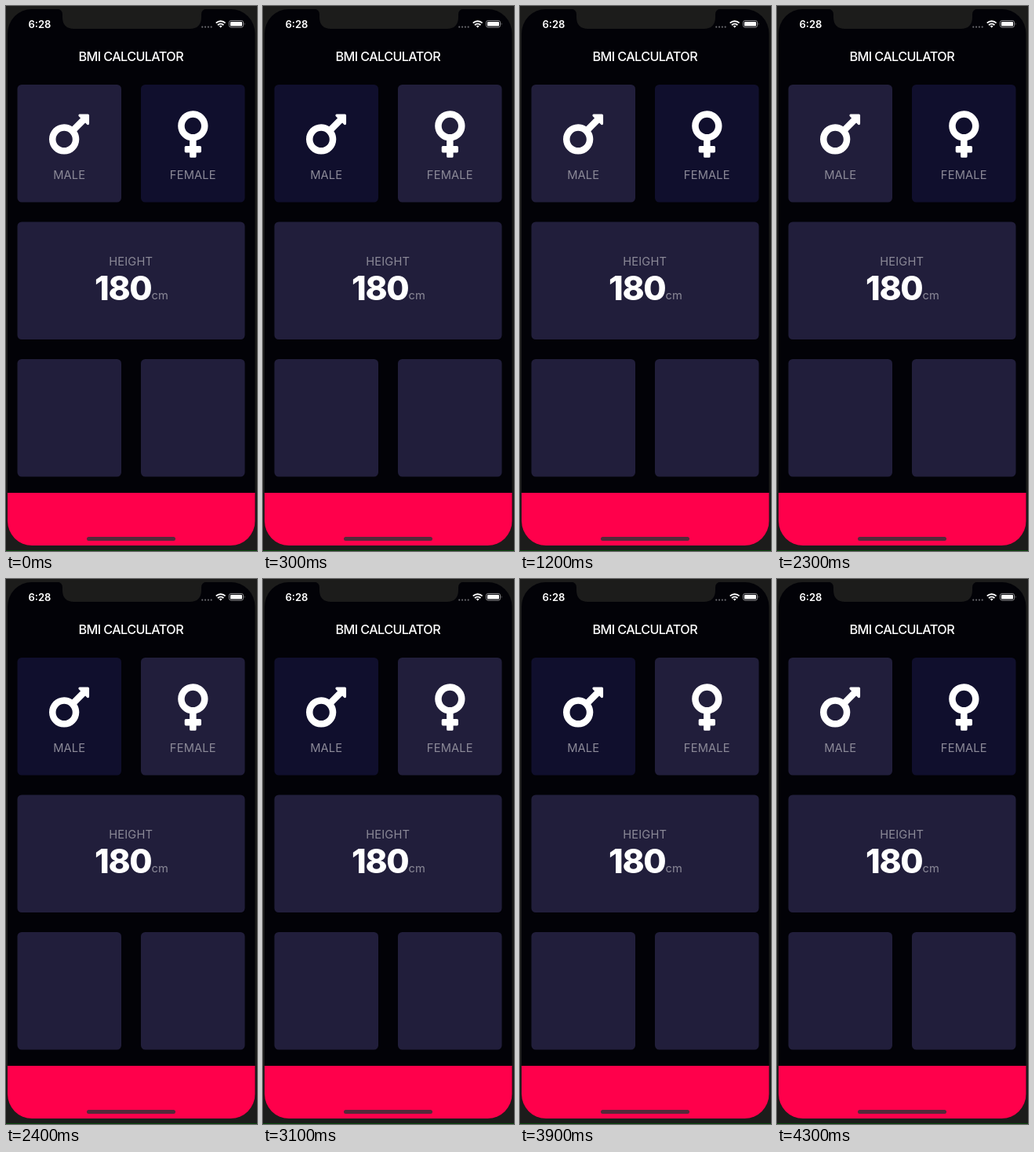
Animation of 320 by 693 pixels, one loop 4400 ms. Source, as an HTML page:

```html
<!DOCTYPE html>
<html lang="en">
<head>
<meta charset="utf-8">
<title>BMI Calculator</title>
<style>
  html, body { margin: 0; width: 100%; height: 100%; overflow: hidden; background: #1c1c1b; }
  svg { display: block; width: 100%; height: 100%; font-family: Inter, "Liberation Sans", sans-serif; }
  .card { fill: #211e3b; }
  .idle { fill: #100f2d; }
  .label { fill: #8b8997; font-size: 14.7px; letter-spacing: .15px; text-anchor: middle; }
  .white { fill: #fff; }
</style>
</head>
<body>
<svg viewBox="0 0 320 693">
  <defs>
    <clipPath id="screen"><rect x="2" y="4" width="315.5" height="682" rx="31"/></clipPath>
  </defs>
  <rect y="692" width="320" height="1" fill="#0b470d"/>

  <g clip-path="url(#screen)">
    <rect width="320" height="693" fill="#020207"/>
    <rect y="619" width="320" height="74" fill="#ff004b"/>
  </g>
  <path fill="#1c1c1b" d="M65 3.5Q72 4 72 11V14Q72 29 87 29H234Q249 29 249 14V11Q249 4 256 3.5Z"/>
  <rect x="103" y="675" width="113" height="5" rx="2.5" fill="#54293a"/>

  <!-- status bar -->
  <text class="white" x="28.5" y="27.5" font-size="13" font-weight="600">6:28</text>
  <path d="M250.3 26.7h12.5" stroke="#66666b" stroke-width="2.2" stroke-linecap="round" stroke-dasharray="0 3.8"/>
  <g fill="none" stroke="#fff" stroke-width="1.9">
    <path d="M267.8 21.6a8.4 8.4 0 0 1 11.8 0M270 24.2a5.3 5.3 0 0 1 7.4 0"/>
    <path d="M271.8 25.6a3 3 0 0 1 3.8 0L273.7 27.8Z" fill="#fff" stroke="none"/>
    <rect x="284.5" y="18.5" width="18" height="8.6" rx="2.4" stroke="#8b8b8e" stroke-width="1"/>
  </g>
  <rect class="white" x="286" y="20" width="15" height="5.6" rx="1.2"/>
  <path d="M303.8 21.2q1.6 1.6 0 3.2z" fill="#8b8b8e"/>

  <text class="white" x="159.3" y="70" font-size="16.2" font-weight="500" letter-spacing="-.6" text-anchor="middle">BMI CALCULATOR</text>

  <g id="cards">
    <rect class="card" id="male" x="14.5" y="100" width="132.5" height="149.5" rx="5.5"/>
    <rect class="card" id="female" x="172" y="100" width="132.5" height="149.5" rx="5.5"/>
    <rect class="card" x="14.5" y="274.5" width="290" height="149.5" rx="5.5"/>
    <rect class="card" x="14.5" y="449" width="132.5" height="149.5" rx="5.5"/>
    <rect class="card" x="172" y="449" width="132.5" height="149.5" rx="5.5"/>
  </g>

  <path class="white" transform="translate(55 129) scale(.133)" d="M372 64h-79c-10.7 0-16 12.9-8.5 20.5l16.9 16.9-80.7 80.7C198.5 167.5 172.3 160 144 160 64.5 160 0 224.5 0 304s64.5 144 144 144 144-64.5 144-144c0-28.3-7.5-54.5-22.2-76.7l80.7-80.7 16.9 16.9c7.6 7.6 20.5 2.2 20.5-8.5V76c0-6.6-5.4-12-12-12zM144 384a80 80 0 1 1 0-160 80 80 0 0 1 0 160z"/>
  <path class="white" transform="translate(219.2 129) scale(.133)" d="M288 176C288 96.5 223.5 32 144 32S0 96.5 0 176c0 68.5 47.9 125.9 112 140.4V368H76q-12 0-12 12v40q0 12 12 12h36v36q0 12 12 12h40q12 0 12-12v-36h36q12 0 12-12v-40q0-12-12-12h-36v-51.6c64.1-14.6 112-71.9 112-140.4zM64 176a80 80 0 1 1 160 0 80 80 0 0 1-160 0z"/>

  <text class="label" x="80.7" y="220.3">MALE</text>
  <text class="label" x="238.3" y="220.3">FEMALE</text>
  <text class="label" x="159.2" y="329.5">HEIGHT</text>
  <text class="white" x="149.2" y="374" font-size="42.5" font-weight="800" letter-spacing="-1.3" text-anchor="middle">180</text>
  <text class="label" x="196.2" y="373">cm</text>
</svg>
<script>
  const LOOP = 4400;
  const taps = [200, 1000, 2400, 4000]; // each tap selects the other card
  const male = document.getElementById('male');
  const female = document.getElementById('female');

  function draw(now) {
    const time = now % LOOP;
    const femaleSelected = taps.filter(tap => time >= tap).length % 2 === 1;
    male.classList.toggle('idle', femaleSelected);
    female.classList.toggle('idle', !femaleSelected);
    requestAnimationFrame(draw);
  }
  draw(performance.now());
</script>
</body>
</html>
```
